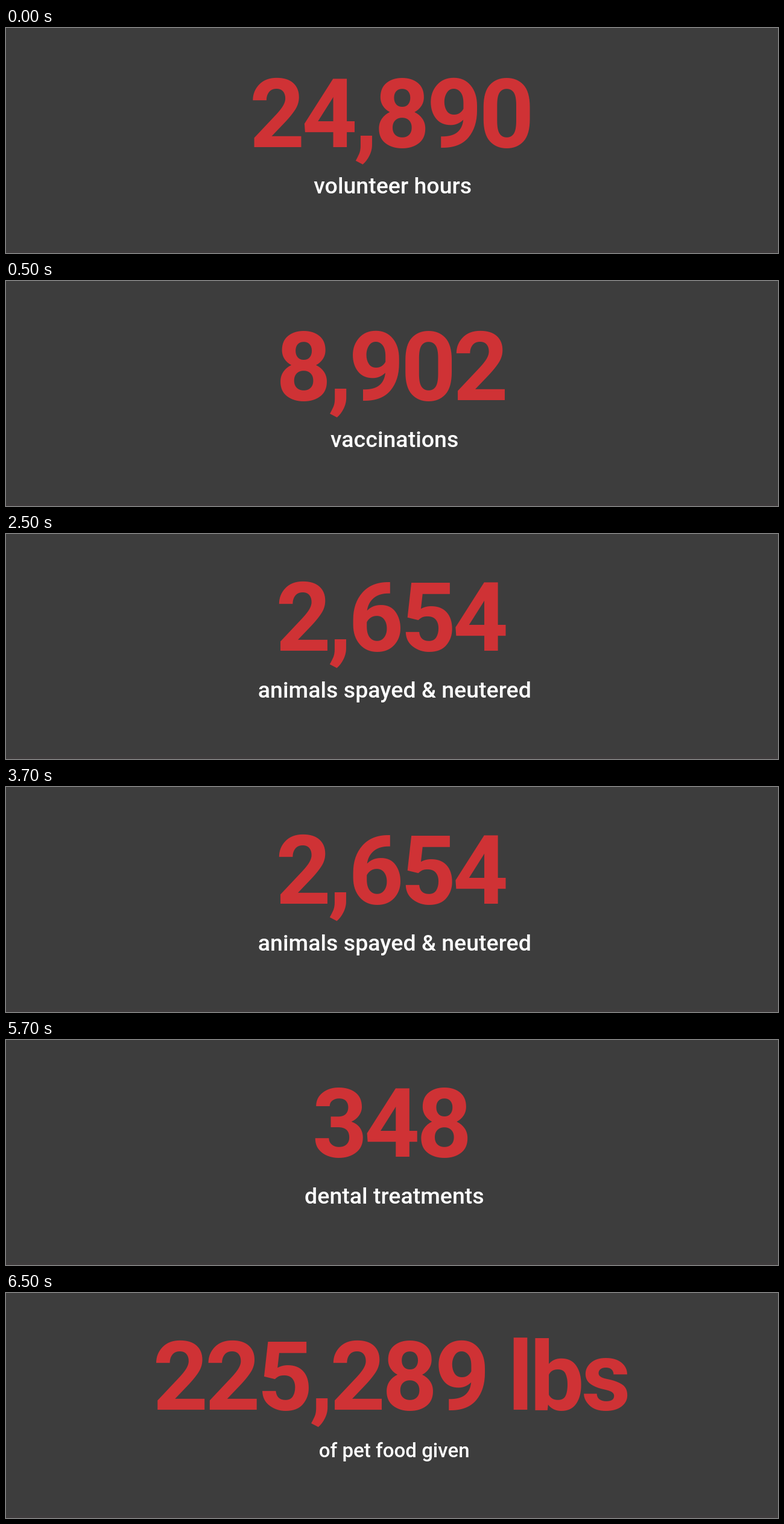
Recreate the animation shown at these times as an HTML page. Size 1280 px wide and 374 px high, loop 8000 ms.

```html
<!DOCTYPE html>
<html lang="en">
<head>
<meta charset="utf-8">
<title>Yearly totals</title>
<style>
  html, body { margin: 0; width: 100%; height: 100%; overflow: hidden; background: #3d3d3d; }
  svg { display: block; width: 100vw; height: 100vh; }
  text { font-family: Roboto, sans-serif; white-space: pre; }
  #total { font-weight: 700; fill: #cf3235; }
  #label { font-weight: 500; fill: #fff; }
</style>
</head>
<body>
<svg viewBox="0 0 1280 374">
  <rect width="1280" height="374" fill="#3d3d3d"/>
  <rect y="370" width="1280" height="4" fill="#403d3e"/>
  <text id="total"></text>
  <text id="label"></text>
</svg>
<script>
const LOOP = 8000;
const TOTAL = { size: 160, weight: 700, spacing: -5.2 };
const LABEL = { size: 37.5, weight: 500, spacing: 0 };

// Each line: text, centre of its ink, baseline
const slides = [
  { at: 0,    total: ['24,890', 639, 198],        label: ['volunteer hours', 640.5, 275] },
  { at: 500,  total: ['8,902', 641, 198],         label: ['vaccinations', 643.5, 276] },
  { at: 2500, total: ['2,654', 640.7, 194],       label: ['animals spayed & neutered', 643.7, 272] },
  { at: 4500, total: ['348', 639.3, 194],         label: ['dental treatments', 643.7, 272] },
  { at: 6500, total: ['225,289 lbs', 639.6, 194], label: ['of pet food given', 643.5, 273], labelSize: 33 }
];

const totalNode = document.getElementById('total');
const labelNode = document.getElementById('label');
const ruler = document.createElement('canvas').getContext('2d');

// Centres the visible ink of a line, ignoring side bearings
function setLine(node, [text, centre, baseline], { size, weight, spacing }) {
  ruler.font = `${weight} ${size}px Roboto, sans-serif`;
  ruler.letterSpacing = spacing + 'px';
  const ink = ruler.measureText(text);
  // The last glyph's spacing does not move its ink
  const middle = (ink.actualBoundingBoxRight - ink.actualBoundingBoxLeft) / 2;
  node.textContent = text;
  node.setAttribute('x', (centre - middle).toFixed(2));
  node.setAttribute('y', baseline);
  node.setAttribute('font-size', size);
  node.setAttribute('letter-spacing', spacing);
}

let shown = null;
function draw(time) {
  const slide = slides.findLast(s => s.at <= time);
  if (slide === shown) return;
  shown = slide;
  setLine(totalNode, slide.total, TOTAL);
  setLine(labelNode, slide.label, { ...LABEL, size: slide.labelSize || LABEL.size });
}

const start = performance.now();
function tick() {
  draw((performance.now() - start) % LOOP);
  requestAnimationFrame(tick);
}
tick();
</script>
</body>
</html>
```
